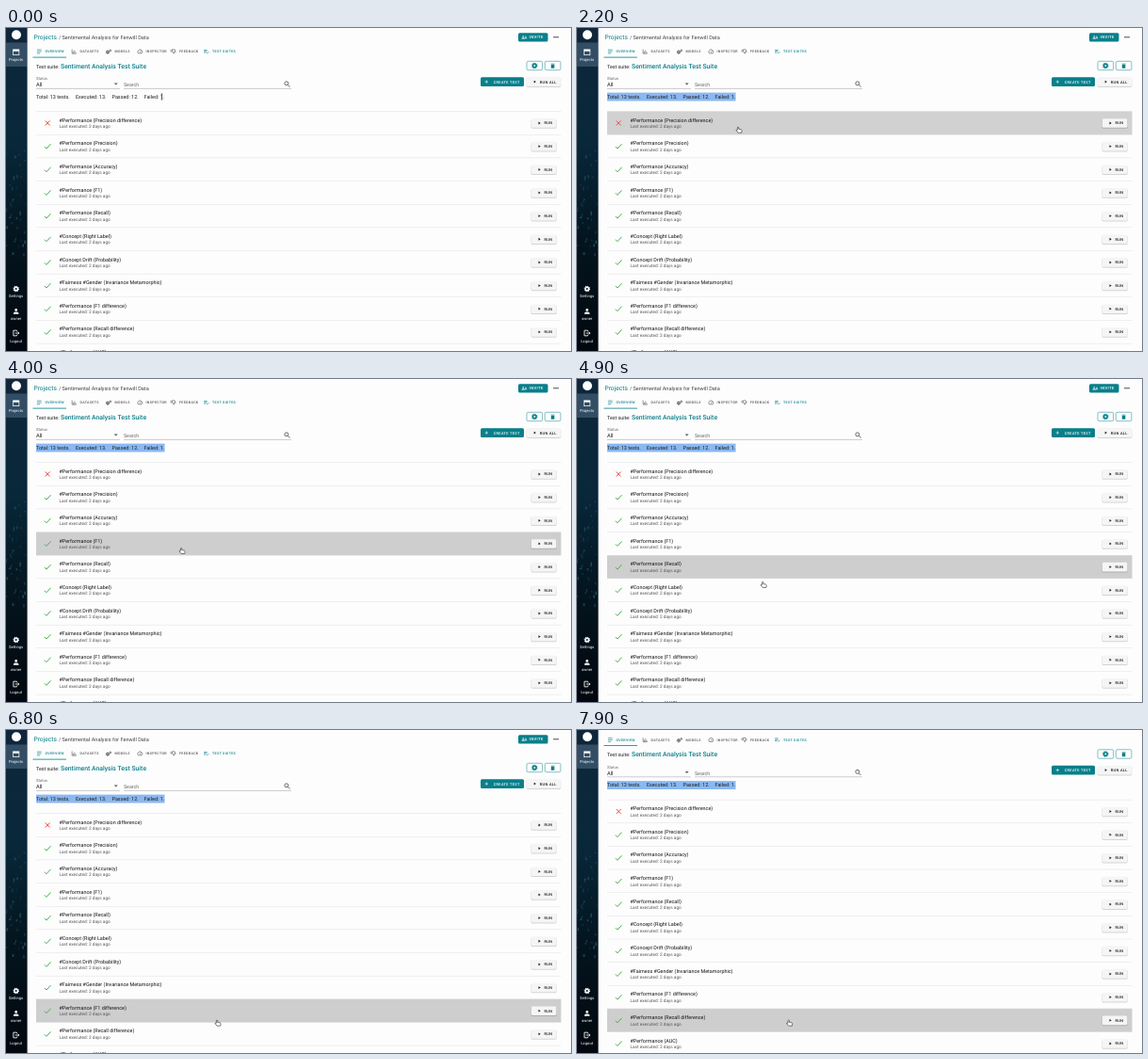
An HTML page that plays this animation: 600 px wide and 343 px high, repeating every 8 s.

```html
<!DOCTYPE html>
<html lang="en">
<head>
<meta charset="utf-8">
<title>Test suite</title>
<style>
  html, body { margin: 0; width: 100%; height: 100%; overflow: hidden; background: #fdfdfd; }
  svg { display: block; width: 600px; height: 343px; }
  text { font-family: Roboto, "Liberation Sans", sans-serif; white-space: pre; text-rendering: geometricPrecision; }
</style>
</head>
<body>
<svg viewBox="0 0 600 343" xmlns="http://www.w3.org/2000/svg">
  <defs>
    <linearGradient id="night" x1="0" y1="0" x2="0" y2="1">
      <stop offset="0" stop-color="#10263a"/>
      <stop offset=".35" stop-color="#08283a"/>
      <stop offset=".65" stop-color="#04151f"/>
      <stop offset="1" stop-color="#02080f"/>
    </linearGradient>
  </defs>
  <g id="page"></g>
  <g id="side"></g>
  <g id="pointer"></g>
</svg>
<script>
const LOOP = 8000, STEP = 100;
const TEAL = '#087f8a', INK = '#1a1a1a', GREY = '#555';
const ROW_TOP = 88.6, ROW_H = 24.65;

// Icons on a 24 unit grid
const LINES = {
  check: 'M4 13l5 5L20 6',
  close: 'M6 6l12 12M18 6L6 18',
  search: 'M15 15l6 6M4 10a6 6 0 0 1 12 0a6 6 0 0 1-12 0',
  plus: 'M12 5v14M5 12h14',
  chart: 'M4 3v17h17M9 18v-6M14 18V7M19 18v-4',
  list: 'M3 5h18M3 12h18M3 19h12',
  tasks: 'M2 6h13M2 11h13M2 16h8M13 16l3 3l6-6',
  gauge: 'M5 19a9 9 0 1 1 14 0zM12 15l4-6',
  thumb: 'M2 4v10M7 4h10l4 9h-7v7L7 13z',
  logout: 'M14 7V4H4v16h10v-3M9 12h12M17 8l4 4l-4 4'
};
const SOLIDS = {
  trash: 'M6 8h12v13H6zM5 4h14v2H5zM9 3h6v2H9z',
  person: 'M8 8a4 4 0 0 1 8 0a4 4 0 0 1-8 0M4 20v-2q0-4 8-4t8 4v2z',
  play: 'M8 5v14l11-7z',
  window: 'M2 3h20v18H2zM4 9v10h16V9z',
  down: 'M6 9h12l-6 6z'
};

const el = id => document.getElementById(id);
function add(parent, tag, attrs, content) {
  const n = document.createElementNS('http://www.w3.org/2000/svg', tag);
  for (const k in attrs) n.setAttribute(k, attrs[k]);
  if (content) n.textContent = content;
  return parent.appendChild(n);
}
const box = (p, x, y, width, height, fill, more) => add(p, 'rect', { x, y, width, height, fill, ...more });
const disc = (p, cx, cy, r, fill, more) => add(p, 'circle', { cx, cy, r, fill, ...more });
const label = (p, x, y, str, size, fill = INK, more) => add(p, 'text', { x, y, 'font-size': size, fill, ...more }, str);
const caps = (p, x, y, str, size, fill) =>
  label(p, x, y, str, size, fill, { 'font-weight': 500, 'letter-spacing': size * 0.089 });
function icon(p, name, cx, cy, size, color) {
  const transform = `translate(${cx - size / 2} ${cy - size / 2}) scale(${size / 24})`;
  if (LINES[name]) add(p, 'path', { d: LINES[name], fill: 'none', stroke: color, 'stroke-width': 2.4, transform });
  else add(p, 'path', { d: SOLIDS[name], fill: color, 'fill-rule': 'evenodd', transform });
}
function gear(p, cx, cy, r, stroke) {
  disc(p, cx, cy, r * 0.65, 'none', { stroke, 'stroke-width': r * 0.6 });
  disc(p, cx, cy, r, 'none', { stroke, 'stroke-width': r * 0.4, 'stroke-dasharray': Math.PI * r / 8 });
}
function greyButton(p, x, y, w, text) {
  box(p, x - 0.3, y + 0.5, w + 0.6, 10.1, '#000', { rx: 1.6, opacity: 0.16 });
  box(p, x, y, w, 9.6, '#f5f5f5', { rx: 1.5 });
  icon(p, 'play', x + 8.5, y + 4.8, 4.8, INK);
  caps(p, x + 13.8, y + 6.2, text, 3.9);
}

// Page
const page = el('page');
label(page, 29.5, 11.8, 'Projects', 6.65, TEAL);
label(page, 56, 11.8, '/', 5.5, GREY);
label(page, 59.5, 11.8, 'Sentimental Analysis for Fenwill Data', 5.6, '#444');

box(page, 544, 5.2, 31.5, 9.2, TEAL, { rx: 1.5 });
icon(page, 'person', 549.2, 9.8, 5, '#fff');
icon(page, 'person', 552, 9.8, 4, '#fff');
caps(page, 555.6, 11.3, 'INVITE', 4.2, '#fff');
for (const x of [582, 584, 586]) disc(page, x, 9.8, 0.75, '#222');

const TABS = [['OVERVIEW', 41.5, 'list'], ['DATASETS', 78.5, 'chart'], ['MODELS', 115.5, 'gears'],
  ['INSPECTOR', 148.5, 'gauge'], ['FEEDBACK', 184, 'thumb'], ['TEST SUITES', 219, 'tasks']];
TABS.forEach(([name, x, pic], i) => {
  const color = i % 5 ? GREY : TEAL;
  if (pic === 'gears') {
    gear(page, x - 7.5, 25.6, 1.8, color);
    gear(page, x - 4.7, 23.9, 1.1, color);
  } else icon(page, pic, x - 6.2, 25, 6.4, color);
  caps(page, x, 26.4, name, 3.65, color);
});
box(page, 28.5, 30.7, 35.5, 0.8, TEAL);

label(page, 32, 42.6, 'Test suite:', 5.35);
label(page, 58, 42.7, 'Sentiment Analysis Test Suite', 6.85, TEAL, { 'font-weight': 500 });
for (const x of [553, 572.3]) box(page, x, 35.3, 16.6, 9.4, '#fff', { rx: 1.5, stroke: TEAL, 'stroke-width': 0.5 });
gear(page, 561.3, 40, 2.7, TEAL);
icon(page, 'trash', 580.6, 40, 7, TEAL);

label(page, 32, 55, 'Status', 4.2, '#666');
label(page, 32, 62.1, 'All', 5.7);
icon(page, 'down', 116.7, 59.6, 8, GREY);
label(page, 125, 62.1, 'Search', 5.25, '#666');
icon(page, 'search', 298.5, 59.5, 8, '#444');
box(page, 32, 64.2, 89, 0.4, '#888');
box(page, 125, 64.2, 178, 0.4, '#888');

box(page, 504, 52.2, 46, 9.8, TEAL, { rx: 1.5 });
icon(page, 'plus', 510.3, 57.1, 6, '#fff');
caps(page, 517.7, 58.5, 'CREATE TEST', 3.9, '#fff');
greyButton(page, 553, 52.3, 36, 'RUN ALL');

const SEL_RIGHT = 168.5;
const sel = box(page, SEL_RIGHT, 68.6, 0, 8.9, '#8ab8f1');
[['Total: 13 tests.', 32], ['Executed: 13.', 74], ['Passed: 12.', 112.5], ['Failed: 1.', 146.5]]
  .forEach(([s, x]) => label(page, x, 74.8, s, 5.45));

const TESTS = ['#Performance (Precision difference)', '#Performance (Precision)', '#Performance (Accuracy)',
  '#Performance (F1)', '#Performance (Recall)', '#Concept (Right Label)', '#Concept Drift (Probability)',
  '#Fairness #Gender (Invariance Metamorphic)', '#Performance (F1 difference)',
  '#Performance (Recall difference)', '#Performance (AUC)'];
const shades = TESTS.map((name, i) => {
  const g = add(page, 'g', { transform: `translate(0 ${ROW_TOP + i * ROW_H})` });
  const shade = box(g, 32, 0, 557.5, ROW_H, '#cecece', { opacity: 0 });
  box(g, 32, -0.2, 557.5, 0.4, '#d8d8d8');
  icon(g, i ? 'check' : 'close', 44.2, 12.4, 10, i ? '#4caf50' : '#ef4a43');
  label(g, 56.5, 11, name, 5.42, '#111');
  label(g, 56.5, 17.6, 'Last executed: 2 days ago', 4.72, GREY);
  greyButton(g, 557.8, 7.6, 26.6, 'RUN');
  return shade;
});

// Side bar
const side = el('side');
box(side, 0, 0, 22.6, 343, 'url(#night)');
let seed = 7;
const rnd = () => (seed = seed * 16807 % 2147483647) / 2147483647;
for (let i = 0; i < 45; i++)
  box(side, rnd() * 21, 115 + rnd() * 125, 0.8 + rnd(), 1 + rnd() * 3, '#4a9cb3', { opacity: 0.1 + rnd() * 0.3 });
box(side, 0, 15.5, 22.6, 25.5, '#8fb4d0', { opacity: 0.28 });
disc(side, 11, 7.3, 5, '#fff');
icon(side, 'window', 10.7, 25.8, 8.5, '#fff');
gear(side, 10.7, 277, 2.7, '#fff');
icon(side, 'person', 10.7, 300.8, 8.5, '#fff');
icon(side, 'logout', 10.7, 324, 8.5, '#fff');
[['Projects', 34.9], ['Settings', 286.2], ['owner', 310], ['Logout', 333.6]]
  .forEach(([s, y]) => label(side, 10.6, y, s, 4.15, '#fff', { 'text-anchor': 'middle' }));

// Pointer shapes
const pointer = el('pointer');
const shape = (d, fill, stroke) => add(pointer, 'path', { d, fill, stroke, 'stroke-width': 0.6, 'stroke-linejoin': 'round' });
const shapes = {
  beam: shape('M-1-3h2M0-3v6M-1 3h2', 'none', '#222'),
  arrow: shape('M-1.5-3v6l1.5-1.500h3z', '#111', '#fff'),
  hand: shape('M-1.6-2.5q.6-1.200 1.300 0v1.800l2.500.5q1 .4.9 1.500l-.4 1.900h-3.600l-2-2.400q-.4-1.200 1.300-.6z', '#fff', '#222')
};

// Motion: pointer key points [time, x, y]
const PATH = [[0, 165.5, 73], [100, 158, 73], [600, 31, 73], [1500, 31, 73], [2200, 172, 108], [2500, 172, 108],
  [3000, 177, 150], [3200, 178, 153], [4840, 196.500, 213], [5000, 201, 227], [5600, 209, 231],
  [5750, 215.500, 270], [6800, 225, 311], [LOOP, 225.700, 311]];
const LAG = 60, TIP = 2.5, FADE = 0.6;

function pointerAt(t) {
  const i = Math.max(1, PATH.findIndex(p => p[0] >= t));
  const [t0, x0, y0] = PATH[i - 1], [t1, x1, y1] = PATH[i];
  const k = (t - t0) / (t1 - t0);
  return [x0 + (x1 - x0) * k, y0 + (y1 - y0) * k];
}
const scrollAt = t => 14.5 * Math.max(0, (t - 6900) / 1000) ** 1.55;

// Each row's shade moves a fixed share of the way to its goal per step
const hover = [];
for (let t = 0, now = TESTS.map(() => 0); t < LOOP; t += STEP) {
  const past = Math.max(0, t - LAG);
  const row = Math.floor((pointerAt(past)[1] - TIP + scrollAt(past) - ROW_TOP) / ROW_H);
  now = now.map((v, i) => v + ((i === row) - v) * FADE);
  hover.push(now);
}

function draw(step) {
  const t = step * STEP, [x, y] = pointerAt(t);
  page.setAttribute('transform', `translate(0 ${-scrollAt(t)})`);
  pointer.setAttribute('transform', `translate(${x} ${y})`);
  const kind = t < 1600 ? 'beam' : y - TIP < ROW_TOP ? 'arrow' : 'hand';
  for (const k in shapes) shapes[k].style.display = k === kind ? '' : 'none';
  const left = t < STEP ? SEL_RIGHT : t < 600 ? Math.max(32, x) : 32;
  sel.setAttribute('x', left);
  sel.setAttribute('width', SEL_RIGHT - left);
  shades.forEach((s, i) => s.setAttribute('opacity', hover[step][i]));
}

const start = performance.now();
function tick() {
  draw(Math.floor(Math.max(0, performance.now() - start) % LOOP / STEP));
  requestAnimationFrame(tick);
}
tick();
</script>
</body>
</html>
```
